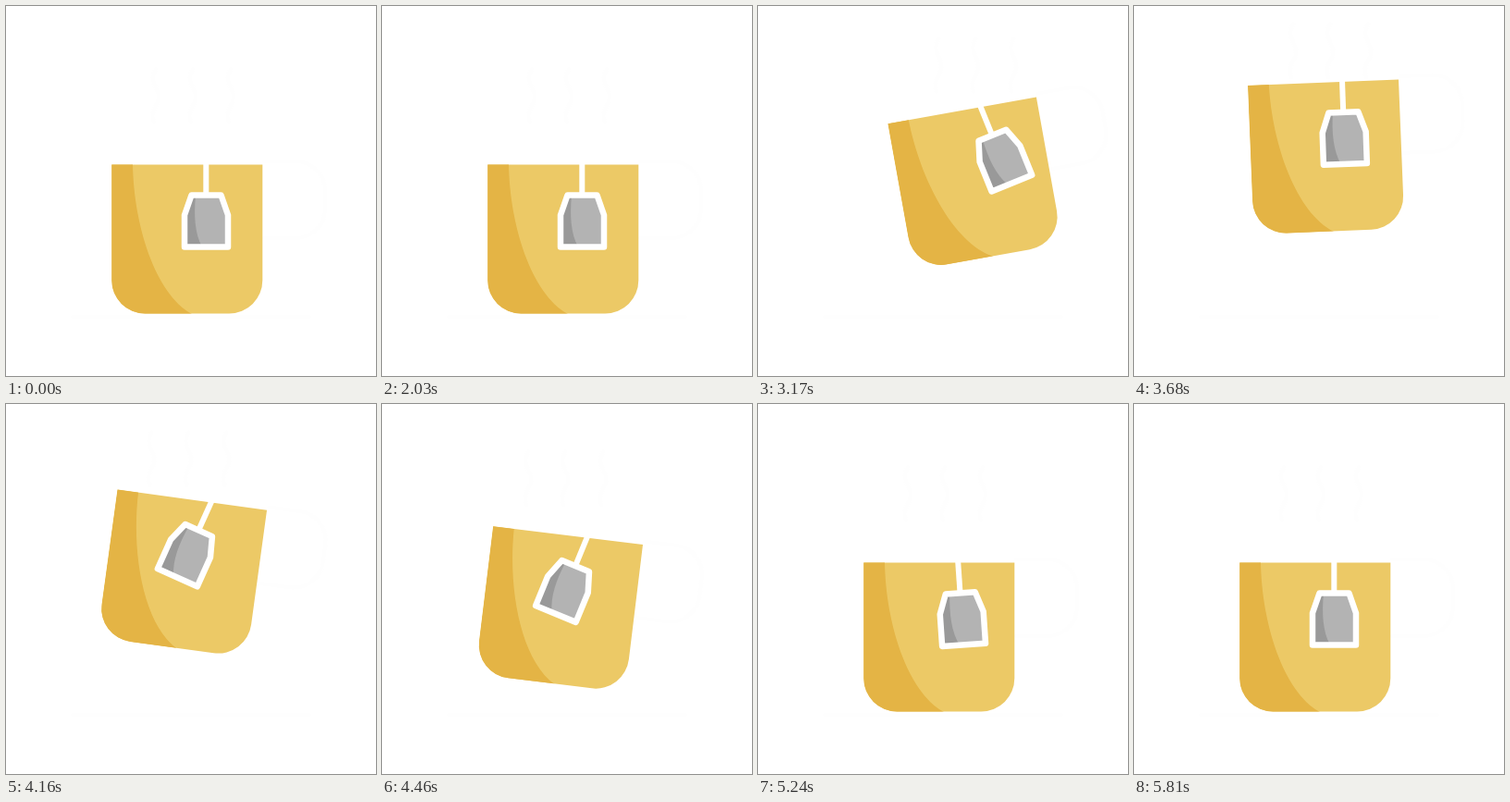
Animation, 400 px wide and 400 px high, one loop 5.84 s. Source, as an HTML page:

```html
<!DOCTYPE html>
<html lang="en">
<head>
<meta charset="utf-8">
<title>Tea cup</title>
<style>
  html, body { margin: 0; width: 100%; height: 100%; overflow: hidden; background: #fff; }
  svg { display: block; width: 100%; height: 100%; }
  .faint { fill: none; stroke: #fefefe; stroke-width: 4; stroke-linecap: round; }
</style>
</head>
<body>
<svg viewBox="0 0 400 400">
  <defs>
    <clipPath id="body"><path id="shape" d="M114.3 171.5H277.3V296.5A36 36 0 0 1 241.3 332.5H150.3A36 36 0 0 1 114.3 296.5Z"/></clipPath>
    <path id="pouch" d="M200.5 204.5H232.5L240 226V260.5H193V226Z"/>
  </defs>
  <path class="faint" d="M72 336H328"/>
  <g id="steam" class="faint">
    <path id="wisp" d="M162 68q-6 10 0 20t0 20t-2 18"/>
    <use href="#wisp" x="40"/>
    <use href="#wisp" x="81"/>
  </g>
  <g id="cup">
    <path class="faint" d="M279 168H313A32 32 0 0 1 345 200V219A32 32 0 0 1 313 251H279"/>
    <use href="#shape" fill="#ecc966"/>
    <path clip-path="url(#body)" fill="#e4b445" d="M114 171H137C138 236 161 311 201 333H114Z"/>
    <g id="bag">
      <path d="M216.3 170V204" stroke="#fff" stroke-width="6"/>
      <use href="#pouch" fill="#b3b3b3"/>
      <path fill="#999" d="M200.5 204.5H205C203 226 204 246 212 260.5H193V226Z"/>
      <use href="#pouch" fill="none" stroke="#fff" stroke-width="6.5" stroke-linejoin="round"/>
    </g>
  </g>
</svg>
<script>
const LOOP = 5840, START = 2030, STEP = 30;

// Turning points of each motion as [ms, value]
const moveX = [[2030, 0], [2745, 50], [4250, -6], [4880, 0]];
const moveY = [[2280, 0], [3720, -89], [3850, -89], [4850, 0]];
const tilt = [[2300, 0], [3180, -10.2], [4300, 8.6], [4870, 0]];
const swing = [[2030, 0], [2480, 10], [3200, -12], [4280, 17.5], [5220, -4], [5550, 2], [5820, 0]];

// Ease in and out between neighbouring turning points
function sample(keys, t) {
  let value = keys[0][1];
  for (let i = 1; i < keys.length; i++) {
    const [t0, v0] = keys[i - 1], [t1, v1] = keys[i];
    const u = Math.min(1, Math.max(0, (t - t0) / (t1 - t0)));
    value += (v1 - v0) * u * u * (3 - 2 * u);
  }
  return value;
}

const [cup, bag, steam] = ["cup", "bag", "steam"].map(id => document.getElementById(id));

function draw(now) {
  const time = now % LOOP;
  const t = time < START ? 0 : START + Math.floor((time - START) / STEP) * STEP;
  const x = sample(moveX, t), y = sample(moveY, t);
  cup.setAttribute("transform", `translate(${x} ${y}) rotate(${sample(tilt, t)} 195.8 252)`);
  bag.setAttribute("transform", `rotate(${sample(swing, t)} 216.3 172)`);
  steam.setAttribute("transform", `translate(${x * 0.85} ${y * 0.55})`);
}

function tick() {
  draw(performance.now());
  requestAnimationFrame(tick);
}
tick();
</script>
</body>
</html>
```
